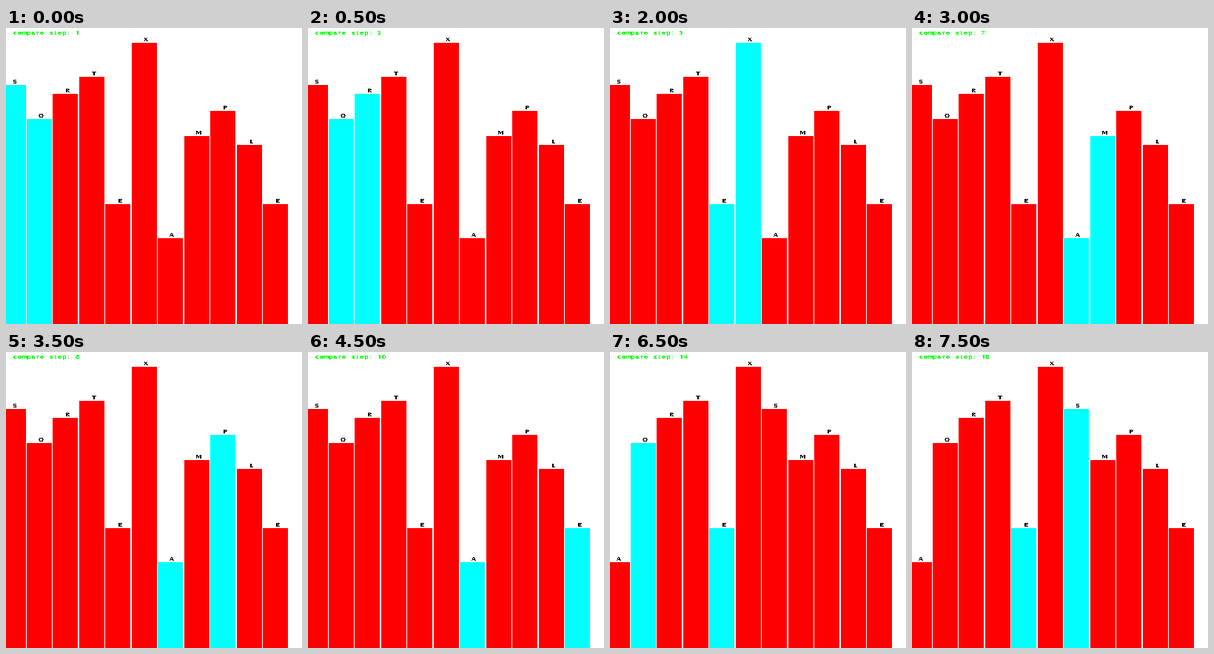
A matplotlib script that plays this animation: 400 px wide and 400 px high, repeating every 8000 ms.

```python
import math
from itertools import islice

import matplotlib.pyplot as plt
from matplotlib.animation import FuncAnimation
from matplotlib.patches import Rectangle

SIZE, DPI = 400, 100
STEPS, STEP_MS = 16, 500
WORD = "SORTEXAMPLE"
PITCH, BAR_W = 35.5, 34
CELL = 6  # character width of the caption
FONT = dict(family="DejaVu Serif", weight="bold", size=8 * 72 / DPI,
            ha="center", va="baseline", antialiased=False)


def selection_sort(word):
    """Yield the letters and the two active positions for every step."""
    a = list(word)
    for i in range(len(a)):
        low = i
        for j in range(i + 1, len(a)):
            yield a[:], (low, j)
            if a[j] < a[low]:
                low = j
        a[i], a[low] = a[low], a[i]
        yield a[:], (i, low)


def bar_left(k):
    return int(PITCH * k - 7.5)


def bar_top(letter):
    return math.ceil(284 - 11.5 * (ord(letter) - ord("A")))


steps = list(islice(selection_sort(WORD), STEPS))

fig = plt.figure(figsize=(SIZE / DPI, SIZE / DPI), dpi=DPI, facecolor="white")
ax = fig.add_axes([0, 0, 1, 1])
ax.set(xlim=(0, SIZE), ylim=(SIZE, 0))
ax.axis("off")

bars = [ax.add_patch(Rectangle((bar_left(k), 0), BAR_W, 0, lw=0, antialiased=False))
        for k in range(len(WORD))]
labels = [ax.text(bar_left(k) + 19.5, 0, "", color="black", **FONT)
          for k in range(len(WORD))]
caption = [ax.text(9.5 + CELL * (k + 0.5), 9, "", color="#00ff00", **FONT)
           for k in range(len("compare step: 10"))]


def draw(n):
    letters, active = steps[n]
    for k, letter in enumerate(letters):
        top = bar_top(letter)
        bars[k].set_y(top)
        bars[k].set_height(SIZE - top)
        bars[k].set_facecolor("#00ffff" if k in active else "#ff0000")
        labels[k].set_text(letter)
        labels[k].set_y(top - 2)
    for cell, char in zip(caption, f"compare step: {n + 1}".ljust(len(caption))):
        cell.set_text(char)
    return bars + labels + caption


anim = FuncAnimation(fig, draw, frames=STEPS, interval=STEP_MS,
                     init_func=lambda: draw(0), repeat=True, repeat_delay=0)
plt.show()
```
